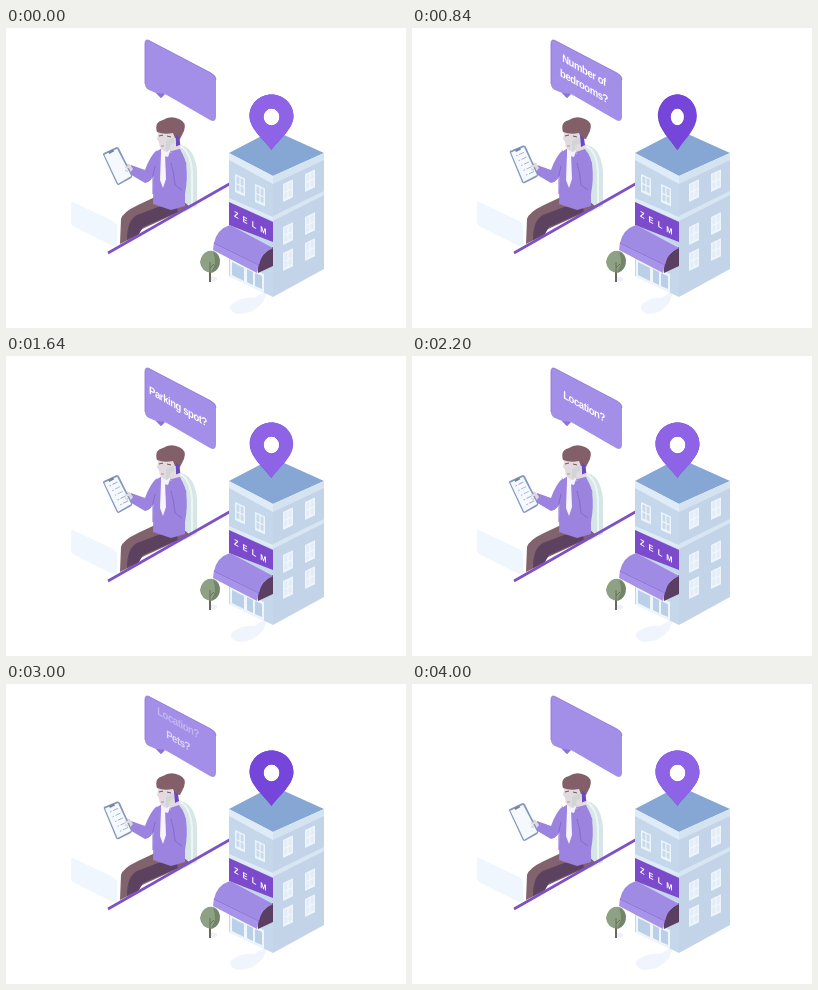
An HTML page for the animation above (4040 ms loop, 400 px wide and 300 px high).

```html
<!DOCTYPE html>
<html lang="en">
<head>
<meta charset="utf-8">
<style>
html, body { margin: 0; width: 100%; height: 100%; overflow: hidden; background: #fff; }
svg { display: block; width: 100vw; height: 100vh; }
text { font-family: "Liberation Sans", Arial, sans-serif; font-weight: bold; fill: #fff; }
.question { font-size: 11px; letter-spacing: -.5px; text-anchor: middle; }
</style>
</head>
<body>
<svg viewBox="0 0 400 300">
  <!-- floor shadows and reply bubble -->
  <path d="M67 174L107 193Q111 195 111 199V215Q111 220 107 218L69 199Q65 197 65 193V176Q65 173 67 174Z" fill="#f0f6fd"/>
  <path id="pinShadow" d="M262 262L257 274Q247 287 231 286Q219 281 227 275Q236 269 248 270Z" fill="#f0f5fd"/>
  <ellipse cx="207" cy="251" rx="4" ry="2.5" fill="#edf2f9"/>

  <!-- chair -->
  <path d="M169 117Q188 115 191 143V178L178 184L172 140Z" fill="#d6e5e5"/>
  <path d="M170 117.5Q184 118 186 144V180" fill="none" stroke="#edf5f5" stroke-width="2"/>

  <!-- man -->
  <path d="M149 169L132 177Q117 184 115 191L114 216L132 207L134 202L184 179L176 172Z" fill="#80636c"/>
  <path d="M152 179L131 187Q121 192 121 212L133 206L137 199L172 184L170 176Z" fill="#5d4260"/>
  <path d="M148 125L156 120L169 119Q177 122 180 136Q182 150 179 166V178L165 182L147 176Z" fill="#9b83df"/>
  <path d="M151 122Q144 128 139 142L125 137L122 145L139 155Q145 155 150 143Z" fill="#9b83df"/>
  <path d="M149 138L147 147V166" fill="none" stroke="#866bcb"/>
  <path d="M155 120L166 118L162 129L158 128L155 130Z" fill="#f5f3fa"/>
  <path d="M155 126L159 126L160 151L157 160L154 152Z" fill="#f7f5fb"/>
  <path d="M165 135Q168 144 169 157L176 162" fill="none" stroke="#866bcb"/>
  <path d="M153 100L167 98L173 109L170 117L161 124Q153 122 153 114L151 111Z" fill="#e2dade"/>
  <path d="M160 113L169 109L167 119L160 124Z" fill="#d0d6d5"/>
  <path d="M151 104Q148 94 157 92Q164 87 173 91Q181 94 178 103L174 111L169 110L167 105Q158 107 151 104Z" fill="#836069"/>
  <path d="M153 108L157 107M161 108L165 109" stroke="#6b5562"/>
  <path d="M155 118L158 118" stroke="#b78f9b"/>
  <g id="phone">
    <path d="M163 118L170 113L174 117L171 124L164 126Z" fill="#e4dbe2"/>
    <path d="M168 107L172 110L173 117L169 119Z" fill="#6a48bf"/>
    <path d="M164 124L173 121L180 135V144L171 140Z" fill="#9b83df"/>
  </g>

  <!-- clipboard -->
  <g id="board">
    <path d="M119 134L124 135L127 140L122 146L117 142Z" fill="#e0d8df"/>
    <path d="M98 125Q97 123 99 122.5L111 117.5Q113 117 114 119L126 146Q126 148 125 149L113 155Q111 156 110 154Z" fill="#8298bb"/>
    <path d="M99 124.5L112 119L125 147L111.5 154Z" fill="#f5f8fd"/>
    <path d="M103 122L108 119.5L109 121.5L104 124Z" fill="#7681aa"/>
    <g id="notes" stroke="#a8b6cd" stroke-width="1"></g>
    <path d="M119 138L124 138M119 141L122 142" stroke="#e0d8df" stroke-width="2"/>
  </g>

  <path d="M102 225L225 155" stroke="#7d50c7" stroke-width="2.6"/>

  <!-- building -->
  <path d="M223 125L267 149V269L223 248Z" fill="#c5d7ea"/>
  <path d="M267 149L318 126V241L267 269Z" fill="#c3d4e8"/>
  <path d="M223 125L267 102L318 125L267 148Z" fill="#86a7d4"/>
  <path d="M223 125L267 148V156L223 132Z" fill="#dfebf6"/>
  <path d="M267 148L318 125V132L267 156Z" fill="#d5e3f1"/>
  <path d="M223 170L267 189V193L223 174Z" fill="#dfebf6"/>
  <path d="M267 188L318 163V167L267 193Z" fill="#d8e5f2"/>
  <g id="windows"></g>
  <path d="M223 174L267 194V214L223 197Z" fill="#7b4bcb"/>
  <text transform="matrix(.88 .5 0 1 228 188.5)" font-size="8.5" letter-spacing="4.6">ZELM</text>
  <path d="M224 231L258 246V265L224 249Z" fill="#eef5fb"/>
  <path d="M226 234L238 240V253L226 247ZM241 241L247 244V257L241 254ZM249 245L256 248V261L249 258Z" fill="#b9d0e8"/>
  <path d="M267 219V238L252 245V237Q255 225 267 219Z" fill="#5a3f63"/>
  <path d="M224 197L267 220Q255 225 253 237L208 215Q211 201 224 197Z" fill="#a08be4"/>
  <path d="M208 214L253 236L251 245L207 222Z" fill="#a794e9"/>
  <path d="M208 215L253 237" stroke="#8a6bd3" stroke-width=".8"/>

  <!-- tree -->
  <path d="M204 238V254" stroke="#6b6462" stroke-width="2"/>
  <path d="M202 223Q212 221 214 232Q214 242 206 245Q195 244 194 234Q195 226 202 223Z" fill="#8fa184"/>
  <path d="M207 224Q216 227 213 238Q210 244 205 244Q212 235 207 224Z" fill="#728667"/>
  <path d="M204 246L204 234M204 240L208 236" stroke="#62705a"/>

  <!-- location pin -->
  <path id="pinEdge" fill-rule="evenodd" fill="#6d42c2"/>
  <path id="pinFace" fill-rule="evenodd"/>

  <!-- question bubble -->
  <path d="M143 12.5L205 45Q210 47.5 210 52V88Q210 95 204 92L159 66L155 70L150 65L143 62Q139 60 139 56V16Q139 10.5 143 12.5Z" fill="#a38fe8"/>
  <path d="M139 56V16Q139 10.5 143 12.5L205 45Q210 47.5 210 52" fill="none" stroke="#8d70d8" stroke-width=".8"/>
  <path d="M150 65L155 70L159 66" fill="#8d70d8"/>
  <g id="questions"></g>
</svg>
<script>
const LOOP = 4040, SPIN = LOOP / 2;
const $ = id => document.getElementById(id);
const clamp = x => Math.max(0, Math.min(1, x));
const ease = x => { x = clamp(x); return x * x * (3 - 2 * x); };
const ramp = (t, from, to) => ease((t - from) / (to - from));

function add(parent, tag, attrs, content = "") {
  const node = document.createElementNS("http://www.w3.org/2000/svg", tag);
  for (const key in attrs) node.setAttribute(key, attrs[key]);
  node.textContent = content;
  return parent.appendChild(node);
}

function addWindow(x, y, slope) {
  const g = add($("windows"), "g", { transform: `matrix(1 ${slope} 0 1 ${x} ${y})` });
  add(g, "rect", { width: 10, height: 18, fill: "#edf4fb" });
  add(g, "rect", { x: 1.5, y: 1.5, width: 7, height: 14, fill: slope > 0 ? "#c8daec" : "#e3edf7" });
  add(g, "path", { d: "M5 1V17M1 9H9", stroke: "#f5f9fd", "stroke-width": 1 });
}
[[229, 146], [249, 156]].forEach(([x, y]) => addWindow(x, y, .45));
for (const y of [156, 199, 225]) {
  addWindow(277, y, -.47);
  addWindow(299, y - 10, -.47);
}

for (let i = 0; i < 5; i++) {
  const x = 104 + i * 2.5, y = 128 + i * 4.8;
  add($("notes"), "path", { d: `M${x} ${y}l1.5 -.7M${x + 3} ${y - 1.4}l5 -2.3` });
}

const questions = [
  { lines: ["Number of", "bedrooms?"], start: 60, end: 820 },
  { lines: ["Parking spot?"], start: 820, end: 1820 },
  { lines: ["Location?"], start: 1820, end: 2820 },
  { lines: ["Pets?"], start: 2820, end: 3640 }
];
const FADE = 300, SLIDE = 18;
for (const q of questions) {
  q.node = add($("questions"), "g", {});
  q.lines.forEach((line, i) => {
    const y = (i - (q.lines.length - 1) / 2) * 16;
    add(q.node, "text", { class: "question", y, transform: "matrix(.866 .5 0 1 0 0)" }, line);
  });
}

// Pin outline squeezed around its vertical axis.
function pinPath(scale, dx) {
  const px = x => (265.5 + dx + x * scale).toFixed(2);
  const pt = (x, y) => `${px(x)} ${y}`;
  const r = 8 * scale;
  return `M${pt(0, 122)}C${pt(-7, 112)} ${pt(-22, 101)} ${pt(-22, 88)}` +
    `C${pt(-22, 76)} ${pt(-12, 66.5)} ${pt(0, 66.5)}` +
    `C${pt(12, 66.5)} ${pt(22, 76)} ${pt(22, 88)}` +
    `C${pt(22, 101)} ${pt(7, 112)} ${pt(0, 122)}Z` +
    `M${px(-8)} 89a${r} 8.5 0 1 0 ${2 * r} 0a${r} 8.5 0 1 0 ${-2 * r} 0Z`;
}

function mix(a, b, k) {
  return `rgb(${a.map((v, i) => Math.round(v + (b[i] - v) * k))})`;
}

function draw(t) {
  const local = t % SPIN;
  const turn = 2 * Math.PI * clamp((local - 235) / 1450);
  const facing = Math.cos(turn);
  const width = Math.max(.04, Math.abs(facing));
  const depth = Math.sin(turn) * Math.sign(facing || 1);
  $("pinEdge").setAttribute("d", pinPath(width, depth));
  $("pinFace").setAttribute("d", pinPath(width, -depth * .5));
  $("pinFace").setAttribute("fill", mix([118, 69, 217], [143, 99, 230], ease((facing + 1) / 2)));
  $("pinShadow").setAttribute("transform", `translate(262 0) scale(${width} 1) translate(-262 0)`);

  const lift = ramp(local, 180, 480) * (1 - ramp(local, 1160, 1640));
  $("board").setAttribute("transform", `translate(0 ${1.2 * (1 - lift)}) rotate(${-2.5 * (1 - lift)} 122 140)`);
  $("phone").setAttribute("transform", `rotate(${3 * (1 - lift)} 177 140)`);
  $("notes").setAttribute("opacity", ramp(t, 100, 450) * (1 - ramp(t, 3600, 3960)));

  for (const { node, start, end } of questions) {
    const enter = ramp(t, start, start + FADE);
    const leave = ramp(t, end, end + FADE);
    node.setAttribute("opacity", enter * (1 - leave));
    node.setAttribute("transform", `translate(172 ${54 + SLIDE * (1 - enter - leave)})`);
  }
}

const begin = performance.now();
function tick() {
  draw((performance.now() - begin) % LOOP);
  requestAnimationFrame(tick);
}
draw(0);
requestAnimationFrame(tick);
</script>
</body>
</html>
```
